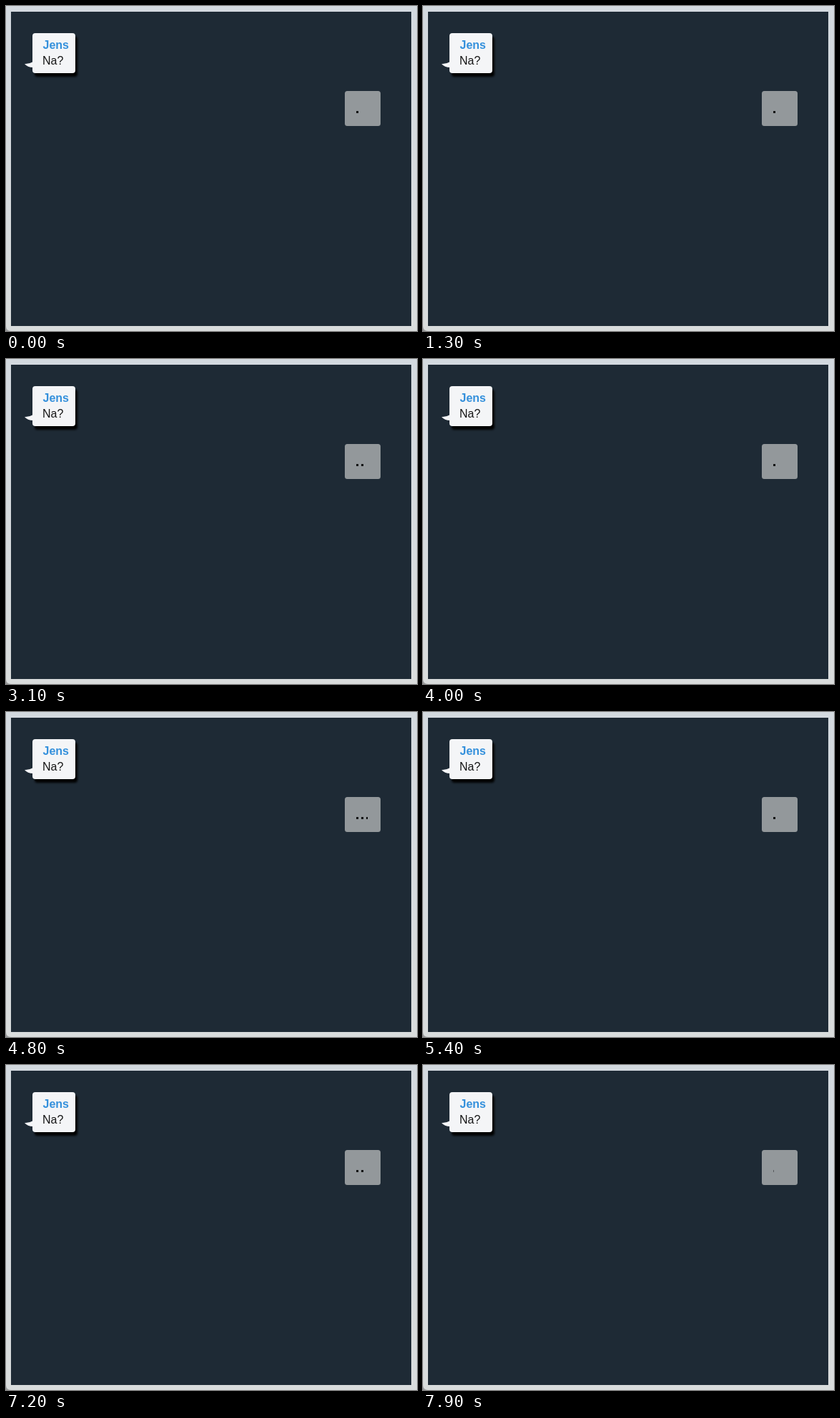
Write an HTML page that moves like this. It is 575 by 455 pixels and loops after 8 s.

```html
<!DOCTYPE html>
<html lang="de">
<head>
<meta charset="utf-8">
<title>Chat</title>
<style>
  html, body { margin: 0; width: 100%; height: 100%; overflow: hidden; }
  svg { display: block; width: 575px; height: 455px; }
  text { font: 16px "Liberation Sans", Arial, sans-serif; }
  .name { font-weight: bold; fill: #3490dc; }
</style>
</head>
<body>
<svg viewBox="0 0 575 455">
  <defs>
    <linearGradient id="frame" x2="0" y2="1">
      <stop stop-color="#d3d9df"/>
      <stop offset="1" stop-color="#d9dcdc"/>
    </linearGradient>
    <filter id="blur" x="-30%" y="-30%" width="160%" height="160%">
      <feGaussianBlur stdDeviation="1.5"/>
    </filter>
    <clipPath id="reveal"><rect id="window" x="487" y="140" width="0" height="16"/></clipPath>
  </defs>

  <rect width="575" height="455" fill="#999b9c"/>
  <path d="M0 0H575V455H7Q0 455 0 448Z" fill="url(#frame)"/>
  <rect x="7" y="8" width="560" height="440" fill="#1e2a35"/>

  <rect x="40" y="43" width="60" height="56" rx="4" filter="url(#blur)"/>
  <path d="M38 78Q32 81.5 26 81Q30 86 38 86Z" fill="#f4f5f7"/>
  <rect x="37" y="38" width="60" height="56" rx="4" fill="#f4f5f7"/>
  <text class="name" x="51.5" y="60">Jens</text>
  <text x="51" y="82" fill="#151515">Na?</text>

  <rect x="474" y="119" width="50" height="49" rx="3.5" fill="#93989b"/>
  <path id="dots" clip-path="url(#reveal)" d="M490.15 147h2.85v3h-2.85zm7 0h2.85v3h-2.85zm7 0h2.85v3h-2.85z"/>
</svg>
<script>
  const LOOP = 8000, TICK = 100;
  const CYCLE = 1372, CYCLE_START = 846;
  const MS_PER_PX = 65.9, LEAD_IN = 172;
  const FIRST_DOT = 490.15, WINDOW_X = 487;
  const revealWindow = document.getElementById('window');
  const start = performance.now();

  // The typing dots are uncovered from the left at constant speed, then hidden at once.
  function draw(ms) {
    const t = Math.floor((ms % LOOP) / TICK) * TICK;
    const phase = (t - CYCLE_START + CYCLE) % CYCLE;
    const edge = FIRST_DOT + (phase - LEAD_IN) / MS_PER_PX;
    revealWindow.setAttribute('width', Math.max(0, edge - WINDOW_X).toFixed(2));
  }

  function loop(now) {
    draw(Math.max(0, now - start));
    requestAnimationFrame(loop);
  }

  draw(0);
  requestAnimationFrame(loop);
</script>
</body>
</html>
```
